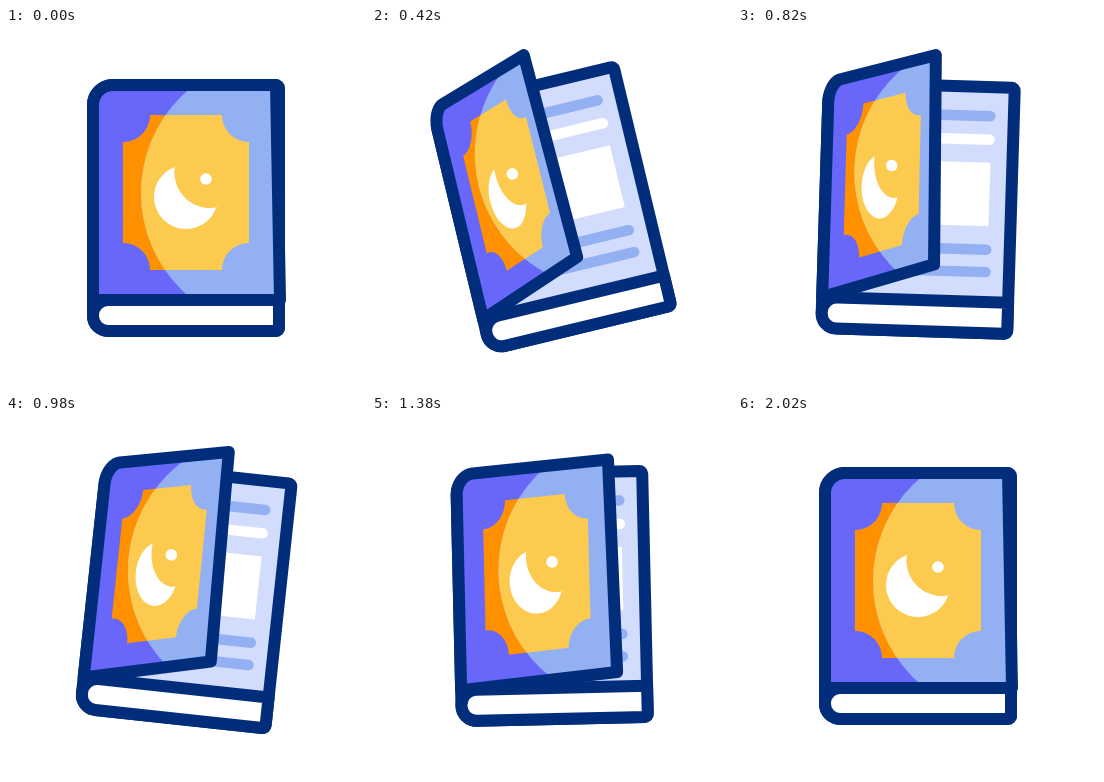
Write an HTML page with a canvas that moves like this. It is 360 px wide and 360 px high and loops after 2.4 s.

```html
<!DOCTYPE html>
<html lang="en">
<head>
<meta charset="utf-8">
<title>Book opening and closing</title>
<style>
  html, body { margin: 0; height: 100%; overflow: hidden; background: #fff; }
  canvas { display: block; }
</style>
</head>
<body>
<canvas id="stage" width="360" height="360"></canvas>
<script>
const ctx = document.getElementById('stage').getContext('2d');
const LOOP = 2400, PI = Math.PI;
const NAVY = '#022d7a', PURPLE = '#6966fa', BLUE = '#93b0f3', PAGE = '#d2dcfd',
      ORANGE = '#ff9100', YELLOW = '#fdca50', WHITE = '#fff';
const HINGE = 87, WIDTH = 186, TOP = 57, HEIGHT = 215;

// [ms, value]
const TILT = [[0, 0], [420, -13.5], [530, -16], [680, -8], [940, 6.5], [1080, 4],
              [1330, -1.5], [1670, 1.6], [2020, 0], [LOOP, 0]];
const SQUEEZE = [[0, 0], [420, 83], [560, 88], [680, 86.5], [980, 64],
                 [1380, 31.5], [1640, 12.5], [2020, 0], [LOOP, 0]];

// Smooth curve through the keys, flat at every extreme
function curve(keys, t) {
  const rise = i => (keys[i + 1][1] - keys[i][1]) / (keys[i + 1][0] - keys[i][0]);
  const slope = i => {
    if (i === 0 || i === keys.length - 1) return 0;
    const a = rise(i - 1), b = rise(i);
    return a * b <= 0 ? 0 : 2 * a * b / (a + b);
  };
  let i = 0;
  while (i < keys.length - 2 && t >= keys[i + 1][0]) i++;
  const [t0, v0] = keys[i], [t1, v1] = keys[i + 1];
  const d = t1 - t0, s = (t - t0) / d, r = 1 - s;
  return v0 * r * r * (1 + 2 * s) + v1 * s * s * (3 - 2 * s)
       + d * s * r * (slope(i) * r - slope(i + 1) * s);
}

function arc(cx, cy, r, from, to) {
  return Array.from({ length: 33 }, (_, i) => {
    const a = from + (to - from) * i / 32;
    return [cx + r * Math.cos(a), cy + r * Math.sin(a)];
  });
}

const COVER = [...arc(107, 77, 20, PI, 1.5 * PI), [270, TOP], [274, 272], [HINGE, 272]];
const PLAQUE = [
  ...arc(117, 87, 27, PI / 2, 0), ...arc(243, 87, 27, PI, PI / 2),
  ...arc(243, 242, 27, 1.5 * PI, PI), ...arc(117, 242, 27, 0, -PI / 2)
];
// Around its own centre
const MOON = [...arc(0, 0, 32, 0.31, 4.37), ...arc(24, -24.6, 35.6, 3.32, 1.343)];

// Place a point of the closed cover on the opened one
function swing([x, y], squeeze, slide = 0, drop = 0) {
  const u = (x - HINGE) / WIDTH, v = (y - TOP) / HEIGHT;
  return [
    HINGE + u * (WIDTH - squeeze + 0.03 * squeeze * v) + slide * squeeze,
    y - u * squeeze * (0.395 + 0.065 * v) + drop * squeeze
  ];
}

function outline(points) {
  ctx.beginPath();
  for (const p of points) ctx.lineTo(...p);
  ctx.closePath();
}

function fill(color) {
  ctx.fillStyle = color;
  ctx.fill();
}

function stroke(color, width) {
  ctx.strokeStyle = color;
  ctx.lineWidth = width;
  ctx.stroke();
}

function pageLine(y, color) {
  ctx.beginPath();
  ctx.moveTo(130, y);
  ctx.lineTo(249.5, y);
  stroke(color, 10.5);
}

function drawBlock() {
  ctx.beginPath();
  ctx.roundRect(HINGE, TOP, WIDTH, 246, [20, 3, 3, 15]);
  fill(PAGE);
  pageLine(86, BLUE);
  pageLine(109.5, WHITE);
  ctx.fillStyle = WHITE;
  ctx.fillRect(120, 132.5, 131, 63.5);
  pageLine(219.5, BLUE);
  pageLine(242, BLUE);

  ctx.beginPath();
  ctx.roundRect(HINGE, TOP, WIDTH, 246, [20, 3, 3, 15]);
  stroke(NAVY, 12);
  ctx.beginPath();
  ctx.roundRect(HINGE, 272, WIDTH, 31, [15, 0, 3, 15]);
  fill(WHITE);
  stroke(NAVY, 12);
}

function drawCover(squeeze) {
  const cover = COVER.map(p => swing(p, squeeze));
  const plaque = PLAQUE.map(p => swing(p, squeeze, 0.025));
  const paint = (ground, label) => {
    outline(cover);
    fill(ground);
    outline(plaque);
    fill(label);
  };
  paint(PURPLE, ORANGE);

  // The shine keeps its round shape while the cover narrows
  const [edge, middle] = swing([135, 165], squeeze, 0, -0.18);
  ctx.save();
  ctx.beginPath();
  ctx.arc(edge + 136, middle, 136, 0, 2 * PI);
  ctx.clip();
  paint(BLUE, YELLOW);
  ctx.restore();

  const [mx, my] = swing([180, 169], squeeze, 0, 0.095);
  outline(MOON.map(([x, y]) => [mx + x * (1 - squeeze / WIDTH), my + y]));
  fill(WHITE);
  ctx.beginPath();
  ctx.arc(...swing([200, 151], squeeze, -0.01, 0.095), 5.8, 0, 2 * PI);
  fill(WHITE);

  outline(cover);
  stroke(NAVY, 12);
}

function draw(now) {
  const t = now % LOOP;
  ctx.fillStyle = WHITE;
  ctx.fillRect(0, 0, 360, 360);
  ctx.save();
  ctx.lineCap = ctx.lineJoin = 'round';
  ctx.translate(180, 180);
  ctx.rotate(curve(TILT, t) * PI / 180);
  ctx.translate(-180, -180);
  drawBlock();
  drawCover(curve(SQUEEZE, t));
  ctx.restore();
}

const start = performance.now();
function tick() {
  draw(performance.now() - start);
  requestAnimationFrame(tick);
}
tick();
</script>
</body>
</html>
```
